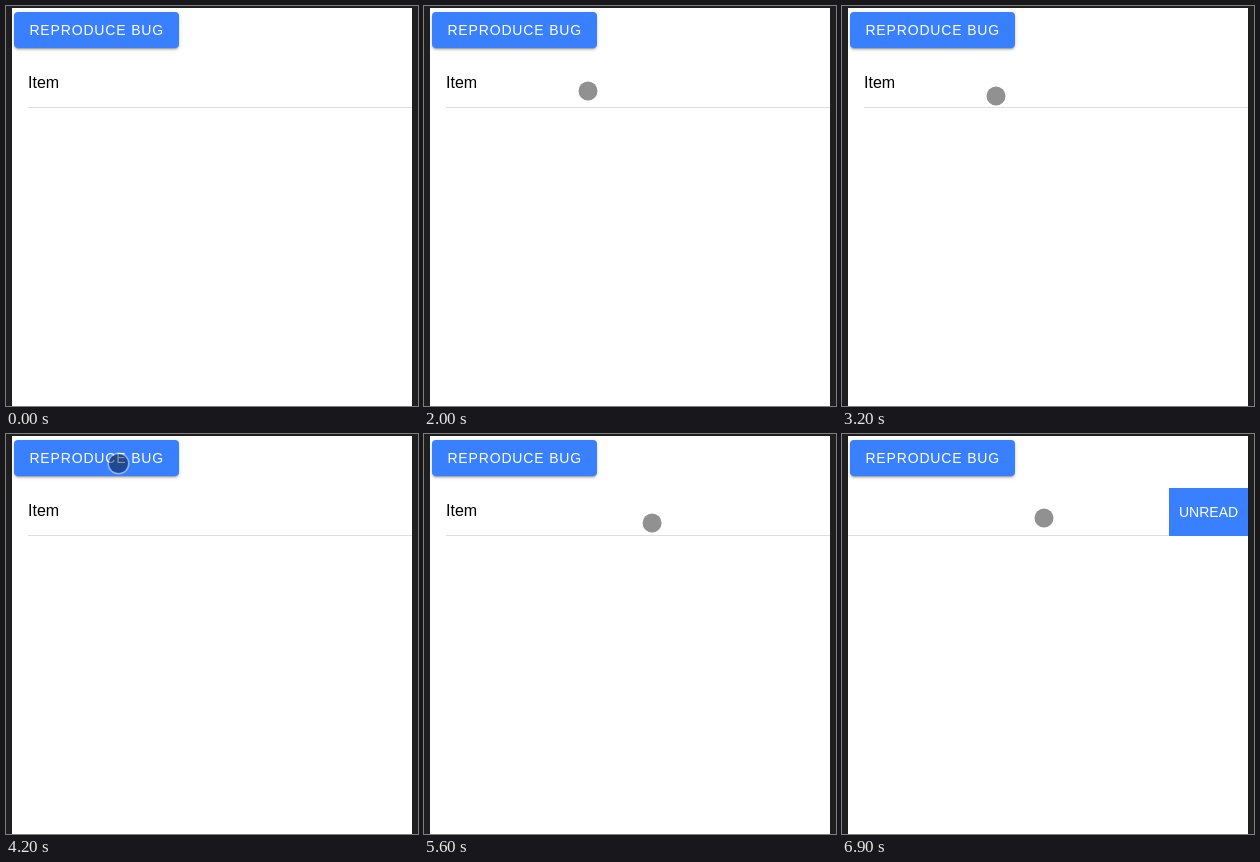
Animation, 412 px wide and 400 px high, one loop 7000 ms. Source, as an HTML page:

```html
<!DOCTYPE html>
<html lang="en">
<head>
<meta charset="utf-8">
<style>
  html, body { margin: 0; width: 100%; height: 100%; overflow: hidden; background: #1f1f1f; }
  body { font-family: "Liberation Sans", Arial, sans-serif; font-size: 14px; white-space: nowrap; }
  div { position: absolute; }
  #page { left: 6px; top: 2px; width: 400px; height: 398px; background: #fff; overflow: hidden; }
  #button {
    left: 2px; top: 4px; width: 165px; height: 36px; line-height: 36px;
    border-radius: 4px; background: #3880ff; color: #fff;
    text-indent: 15.4px; letter-spacing: .84px;
    box-shadow: 0 3px 1px -2px rgba(0,0,0,.2), 0 2px 2px rgba(0,0,0,.14), 0 1px 5px rgba(0,0,0,.12);
  }
  #button.down {
    box-shadow: 0 3px 5px -1px rgba(0,0,0,.2), 0 6px 10px rgba(0,0,0,.14), 0 1px 18px rgba(0,0,0,.12);
  }
  #clip { inset: 0; border-radius: 4px; overflow: hidden; }
  #ripple { left: 5.5px; top: -76px; width: 200px; height: 200px; border-radius: 50%; background: #fff; }
  #option {
    right: 0; top: 52px; width: 79px; height: 48px; line-height: 48px;
    background: #3880ff; color: #fff; text-indent: 10px;
  }
  #item { left: 0; top: 52px; width: 400px; height: 48px; background: #fff; }
  #label {
    left: 16px; right: 0; height: 47px; line-height: 45px; font-size: 16px;
    color: #000; border-bottom: 1px solid #dedede;
  }
  #touch {
    left: -15.8px; top: -12px; width: 19px; height: 19px; border-radius: 50%;
    background: rgba(0,0,0,.43); box-shadow: 0 0 0 1.6px rgba(255,255,255,.4);
  }
</style>
</head>
<body>
<div id="page">
  <div id="button">REPRODUCE BUG<div id="clip"><div id="ripple"></div></div></div>
  <div id="option">UNREAD</div>
  <div id="item"><div id="label">Item</div></div>
  <div id="touch"></div>
</div>
<script>
  const LOOP = 7000, STEP = 100, PRESS = 4300, RELEASE = 5900, OPEN = 79;
  const el = id => document.getElementById(id);
  const button = el('button'), ripple = el('ripple'), item = el('item'), touch = el('touch');

  const ramp = (t, from, to) => Math.min(1, Math.max(0, (t - from) / (to - from)));
  const ease = p => p * p * (3 - 2 * p);
  const mix = (a, b, p) => a + (b - a) * p;

  const entry = { x: 403, y: 30 };
  const moves = [
    { from: 400, to: 800, x: 345, y: 153 },      // enter
    { from: 800, to: 1200, x: 279.5, y: 88.5 },
    { from: 1200, to: 2000, x: 164.5, y: 85.5 }, // swipes without effect
    { from: 2000, to: 2400, x: 298, y: 71 },
    { from: 2400, to: 2900, x: 148.5, y: 93.5 },
    { from: 3000, to: 3200, x: 154.5, y: 90.5 },
    { from: 3400, to: 4200, x: 113, y: 30 },     // press the button
    { from: 4800, to: 5300, x: 233.5, y: 89.5 },
    { from: 5540, to: 6100, x: 79.5, y: 91 },    // swipe the item open
    { from: 6400, to: 6700, x: 357, y: 81 },
    { from: 6700, to: 6900, x: 202.5, y: 84.5 }
  ];

  function pointer(t) {
    let { x, y } = entry;
    for (const m of moves) {
      const p = ease(ramp(t, m.from, m.to));
      x = mix(x, m.x, p);
      y = mix(y, m.y, p);
    }
    return { x, y };
  }

  // The item follows the pointer, resists past its limit, then settles there.
  function slide(t) {
    if (t < 5500) return 0;
    const drag = Math.max(0, 228.5 - pointer(Math.min(t, RELEASE)).x);
    const pulled = drag < OPEN ? drag : mix(OPEN, drag, .55);
    return mix(pulled, OPEN, ease(ramp(t, RELEASE, RELEASE + 200)));
  }

  function draw(now) {
    const t = Math.floor(now % LOOP / STEP) * STEP;
    const { x, y } = pointer(t);
    touch.style.visibility = t < 500 ? 'hidden' : 'visible';
    touch.style.transform = `translate(${x}px, ${y}px)`;
    item.style.left = -slide(t) + 'px';
    ripple.style.transform = `scale(${ramp(t, PRESS, PRESS + 250)})`;
    ripple.style.opacity = .16 * (1 - ramp(t, PRESS + 300, PRESS + 600));
    button.className = t > PRESS + 100 && t < PRESS + 400 ? 'down' : '';
  }

  const start = performance.now();
  function frame() {
    draw(performance.now() - start);
    requestAnimationFrame(frame);
  }
  frame();
</script>
</body>
</html>
```
